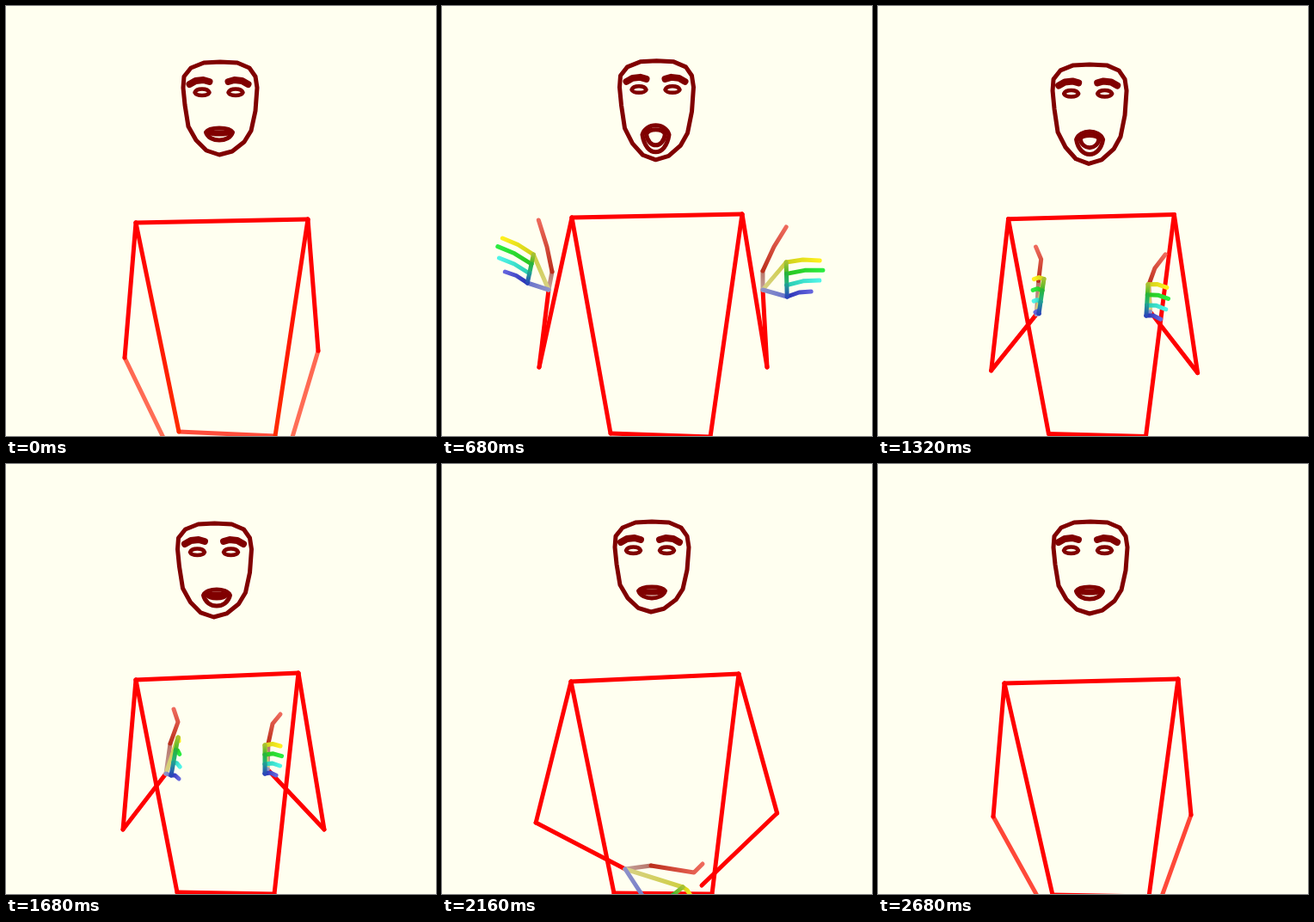
Animation, 500 px wide and 500 px high, one loop 2.72 s. Source, as an HTML page with a canvas:

```html
<!DOCTYPE html>
<html lang="en">
<head>
<meta charset="utf-8">
<title>Pose skeleton</title>
<style>
  html, body { margin: 0; width: 100%; height: 100%; overflow: hidden; background: #fffff0; }
  canvas { display: block; }
</style>
</head>
<body>
<canvas id="stage" width="500" height="500"></canvas>
<script>
const ctx = document.getElementById('stage').getContext('2d');
const LOOP = 2720, STEP = 40;
const KEY_TIMES = [0, 400, 680, 1000, 1680, 2160, 2680];
const DARK = '#800000';

// Each track holds one "x,y" pair per key time.
const track = text => text.split(' ').map(pair => pair.split(',').map(Number));
const tracks = group =>
  Object.fromEntries(Object.entries(group).map(([name, text]) => [name, track(text)]));

const face = tracks({
  crown: '249,65 248.5,64 249.5,65 249,67 242.5,69 244,67 247,67',
  chin: '248,173 247,171 248.5,180 247,188 245,178 244,172 246,174',
  eyes: '247.5,100 246.5,97 248.5,98 246,101 242,102 242,100 244,100',
  lips: '142,156 139,158 140,171 146,179 146,165 143,156 143,157',
  gap: '147,149 144,150 145,163 150,172 151,156 148,150 148,150'
});

const left = tracks({
  shoulder: '151,252 150,254 151,246 152,245 151,251 150,253 147,255',
  hip: '201,495 203,500 196,497 198,497 199,498 200,499 203,501',
  elbow: '138,409 119,414 113,420 128,423 136,425 110,417 134,410',
  wrist: '200,537 177,424 124,330 183,357 186,360 213,471 205,538',
  thumbBase: '215,540 185,408 128,309 183,315 191,325 243,467 222,540',
  thumbMid: '225,560 206,391 122,280 181,290 200,300 293,475 240,560',
  thumbTip: '235,570 211,373 116,249 174,276 195,285 303,465 250,570',
  indexBase: '225,580 203,405 110,289 187,317 200,318 280,492 245,580',
  indexTip: '230,610 238,423 74,270 165,314 201,322 290,503 250,610',
  pinkyBase: '205,580 194,445 103,322 183,354 192,362 245,520 210,580',
  pinkyTip: '210,600 225,458 77,309 168,348 201,366 255,535 215,605'
});

const right = tracks({
  shoulder: '351,248 350,248 349,242 348,242 340,243 345,244 349,250',
  hip: '313,500 319,500 312,501 311,501 312,500 314,500 315,503',
  elbow: '363,401 380,408 378,420 373,428 370,425 389,406 364,408',
  wrist: '322,538 338,443 373,330 327,356 304,355 302,490 318,536',
  thumbBase: '310,545 324,432 373,308 323,324 305,325 290,505 306,545',
  thumbMid: '300,560 305,428 386,280 332,307 310,302 275,520 296,560',
  thumbTip: '290,570 285,432 398,257 347,287 319,291 262,530 286,570',
  indexBase: '300,580 310,451 398,298 325,321 301,327 270,540 296,580',
  indexTip: '295,610 274,492 437,296 350,327 319,328 250,560 291,610',
  pinkyBase: '318,580 325,480 399,338 321,360 301,360 290,550 314,580',
  pinkyTip: '312,605 296,498 427,332 341,366 314,362 275,570 308,605'
});

// Redness of upper body and forearms, 1 = fully confident.
const confidence = track('.85,.55 1,1 1,1 1,1 1,1 1,1 1,.7');

const OUTLINE = track('-34,7 -19,1 0,0 20,1 34,7 41,17 43,30 41,57 36,80 28,93 ' +
  '14,104 -1,108 -16,103 -28,91 -37,75 -41,50 -43,30 -42,17');

const mix = (a, b, u) => a.map((v, i) => v + (b[i] - v) * u);
const bump = (t, centre, width) => Math.exp(-(((t - centre) / width) ** 2));

function sample(keys, t) {
  let i = 0;
  while (i < KEY_TIMES.length - 2 && t >= KEY_TIMES[i + 1]) i++;
  // The arms fling outward faster than the rest.
  const span = i === 1 ? 220 : KEY_TIMES[i + 1] - KEY_TIMES[i];
  const u = Math.min(1, (t - KEY_TIMES[i]) / span);
  return mix(keys[i], keys[i + 1], u * u * (3 - 2 * u));
}

const poseAt = (group, t) =>
  Object.fromEntries(Object.entries(group).map(([name, keys]) => [name, sample(keys, t)]));

function line(points, from, to = from, width = 5, closed = false) {
  const a = points[0], b = points[points.length - 1];
  const paint = ctx.createLinearGradient(...a, ...b);
  paint.addColorStop(0, from);
  paint.addColorStop(1, to);
  ctx.strokeStyle = from === to ? from : paint;
  ctx.lineWidth = width;
  ctx.beginPath();
  points.forEach(p => ctx.lineTo(...p));
  if (closed) ctx.closePath();
  ctx.stroke();
}

// Almond shape that touches the given top and bottom.
function almond(x, half, top, bottom, corner, width) {
  const reach = y => corner + (y - corner) * 4 / 3;
  ctx.strokeStyle = DARK;
  ctx.lineWidth = width;
  ctx.beginPath();
  ctx.moveTo(x - half, corner);
  ctx.bezierCurveTo(x - half * .75, reach(top), x + half * .75, reach(top), x + half, corner);
  ctx.bezierCurveTo(x + half * .75, reach(bottom), x - half * .75, reach(bottom), x - half, corner);
  ctx.closePath();
  ctx.stroke();
}

function drawFace(t) {
  const { crown, chin, eyes, lips, gap } = poseAt(face, t);
  const jaw = chin[1] - crown[1] - 108;
  ctx.save();
  ctx.translate(0, -14 * bump(t, 585, 60));
  line(OUTLINE.map(([x, y]) => [crown[0] + x, crown[1] + y + jaw * (y / 108) ** 2]),
    DARK, DARK, 5, true);
  for (const side of [-1, 1]) {
    const at = (x, y) => [eyes[0] + side * x, eyes[1] + y];
    line([at(34, -9), at(27, -13), at(18, -14), at(11, -12)], DARK, DARK, 8);
    almond(eyes[0] + side * 19.5, 8.5, eyes[1] - 3.5, eyes[1] + 4, eyes[1] + .5, 4.5);
  }
  const corner = lips[0] + (lips[1] - lips[0]) * .35;
  almond(chin[0], 15.5, ...lips, corner, 5);
  almond(chin[0], 11, ...gap, gap[0] + (gap[1] - gap[0]) * .3, 5);
  ctx.restore();
}

function drawHand(p) {
  const base = u => mix(p.indexBase, p.pinkyBase, u);
  const finger = (u, stretch, from, to) => {
    const root = base(u);
    const tip = mix(root, mix(p.indexTip, p.pinkyTip, u), stretch);
    const [x, y] = mix(root, tip, .5);
    line([root, [x, y - 2], tip], from, to);
  };
  line([p.wrist, p.thumbBase], '#c3a29a', '#b87468');
  line([p.thumbBase, p.thumbMid, p.thumbTip], '#bb2f1c', '#ee6a5c');
  line([p.wrist, p.indexBase], '#d8d188', '#cfcf40');
  line([p.wrist, p.pinkyBase], '#8f92c8', '#6672cc');
  finger(0, 1, '#cdd01c', '#fff01e');
  finger(1 / 3, 1.2, '#28c41e', '#2cec40');
  finger(2 / 3, 1.2, '#28ccb0', '#50f4e8');
  finger(1, 1, '#2630b4', '#6464dc');
  line([base(0), base(1 / 3)], '#a6c034', '#3cb828');
  line([base(1 / 3), base(2 / 3)], '#28b43c', '#22b08c');
  line([base(2 / 3), base(1)], '#229c94', '#2a46b8');
}

function draw(t) {
  const l = poseAt(left, t), r = poseAt(right, t);
  const [torso, forearm] = sample(confidence, t);
  const red = c => `rgb(255,${Math.round(255 * (1 - c))},${Math.round(200 * (1 - c))})`;
  const sides = `rgb(255,${Math.round(300 * (1 - torso))},0)`;

  // Hands swing a little past their resting place, elbows flare late.
  const swing = 10 * bump(t, 630, 50), flare = bump(t, 2250, 60);
  for (const name of ['thumbTip', 'indexTip', 'pinkyTip', 'indexBase', 'pinkyBase']) {
    l[name][0] -= swing;
    r[name][0] += swing * .6;
  }
  l.elbow[0] -= 8 * flare;
  r.elbow[0] += 6 * flare;

  ctx.fillStyle = '#fffff0';
  ctx.fillRect(0, 0, 500, 500);
  ctx.lineCap = ctx.lineJoin = 'round';
  line([l.hip, r.hip], red(torso - (1 - torso)));
  for (const p of [l, r]) {
    line([p.shoulder, p.hip], '#ff0000', sides);
    line([p.elbow, p.wrist], red(forearm + (1 - forearm) * .1), red(forearm));
    line([p.shoulder, p.elbow], '#ff0000');
  }
  line([l.shoulder, r.shoulder], '#ff0000');
  drawHand(l);
  if (t < 2100) drawHand(r);
  drawFace(t);
}

function tick() {
  draw(Math.floor(performance.now() % LOOP / STEP) * STEP);
  requestAnimationFrame(tick);
}
tick();
</script>
</body>
</html>
```
